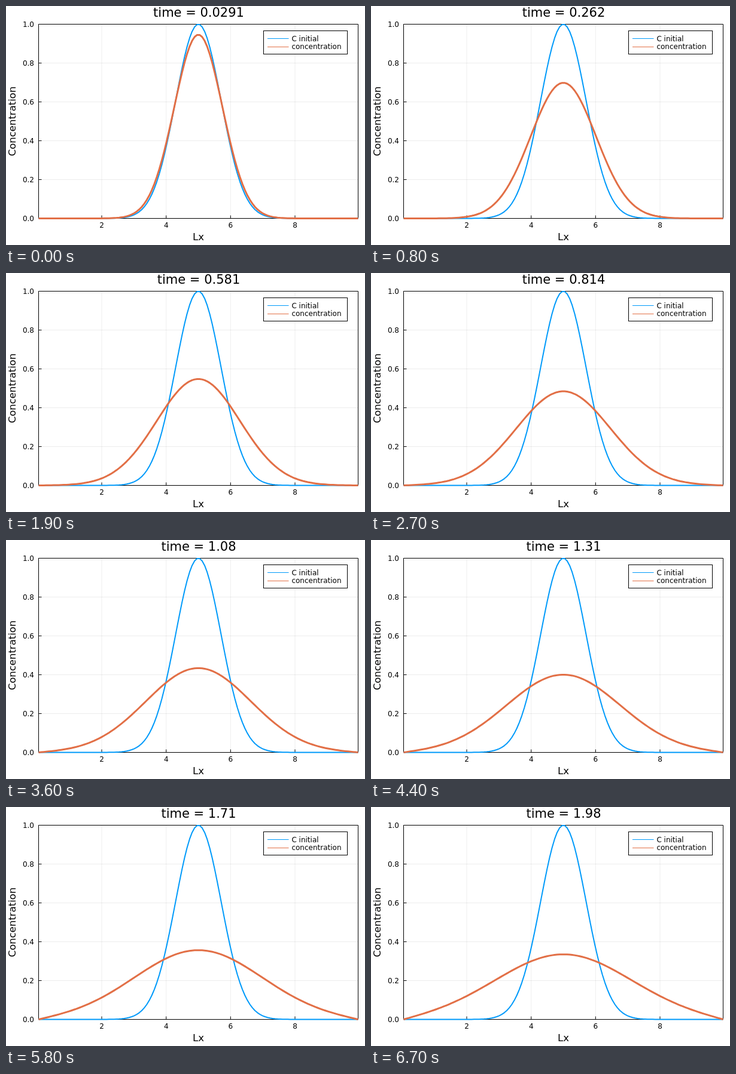
These frames come from a looping animation (600 by 400 pixels, 6.8 s). An HTML page:

```html
<!DOCTYPE html>
<html lang="en">
<head>
<meta charset="utf-8">
<title>Diffusion of a concentration peak</title>
<style>
  html, body { margin: 0; width: 100%; height: 100%; overflow: hidden; background: #fff; }
  svg { display: block; font: 12px "DejaVu Sans", sans-serif; }
  path, rect { fill: none; stroke: #000; }
  .mid { text-anchor: middle; }
  .end { text-anchor: end; }
  #grid { stroke-opacity: .07; }
  .initial { stroke: #009afa; stroke-width: 2; stroke-linejoin: round; }
  .current { stroke: #e26f46; stroke-width: 3; stroke-linejoin: round; }
  .key { stroke-width: 1.2; }
</style>
</head>
<body>
<svg width="600" height="400" viewBox="0 0 600 400">
  <path id="grid"/>
  <path id="axes"/>
  <g id="labels"></g>
  <text id="title" class="mid" x="322" y="18" font-size="21"></text>
  <text class="mid" x="321.5" y="392" font-size="16.5">Lx</text>
  <text class="mid" transform="translate(16 193) rotate(-90)" font-size="16.5">Concentration</text>
  <path id="initial" class="initial"/>
  <path id="current" class="current"/>
  <rect x="430.5" y="41.5" width="140" height="39" style="fill:#fff"/>
  <path class="initial key" d="M437 54.5H472.5"/>
  <path class="current key" d="M437 68.5H472.5"/>
  <text x="477.4" y="59">C initial</text>
  <text x="477.4" y="72">concentration</text>
</svg>
<script>
const $ = id => document.getElementById(id);
const left = 54.5, right = 588.5, top_ = 30.5, bottom = 355.5;
const cells = 128, length = 10, dx = length / cells;
const dt = dx * dx / 2.1, stepsPerFrame = 10;
const frameCount = 68, frameMs = 100;

const px = x => left + (x - dx / 2) / (length - dx) * (right - left);
const py = c => bottom - c * (bottom - top_);
const curve = c => 'M' + c.map((v, i) => px((i + .5) * dx).toFixed(2) + ' ' + py(v).toFixed(2)).join('L');

// Axes, ticks and grid
let grid = '', axes = `M${left} ${top_}H${right}V${bottom}H${left}Z`, labels = '';
for (const x of [2, 4, 6, 8]) {
  const p = px(x).toFixed(1);
  grid += `M${p} ${top_}V${bottom}`;
  axes += `M${p} ${bottom}v-5`;
  labels += `<text class="mid" x="${p}" y="371">${x}</text>`;
}
for (let i = 0; i <= 5; i++) {
  const p = py(i / 5);
  grid += `M${left} ${p}H${right}`;
  axes += `M${left} ${p}h5`;
  labels += `<text class="end" x="47" y="${p + 4.5}">${(i / 5).toFixed(1)}</text>`;
}
$('grid').setAttribute('d', grid);
$('axes').setAttribute('d', axes);
$('labels').innerHTML = labels;

// Explicit diffusion with fixed end cells
const diffuse = c => c.map((v, i) =>
  i && i < cells - 1 ? v + (c[i - 1] - 2 * v + c[i + 1]) / 2.1 : v);

let c = Array.from({ length: cells }, (_, i) => Math.exp(-(((i + .5) * dx - length / 2) ** 2)));
$('initial').setAttribute('d', curve(c));
const frames = Array.from({ length: frameCount }, () => {
  for (let s = 0; s < stepsPerFrame; s++) c = diffuse(c);
  return curve(c);
});

function draw() {
  const n = Math.floor(performance.now() / frameMs) % frameCount;
  const time = (n + 1) * stepsPerFrame * dt;
  $('title').textContent = 'time = ' + Number(time.toPrecision(3));
  $('current').setAttribute('d', frames[n]);
  requestAnimationFrame(draw);
}
draw();
</script>
</body>
</html>
```
